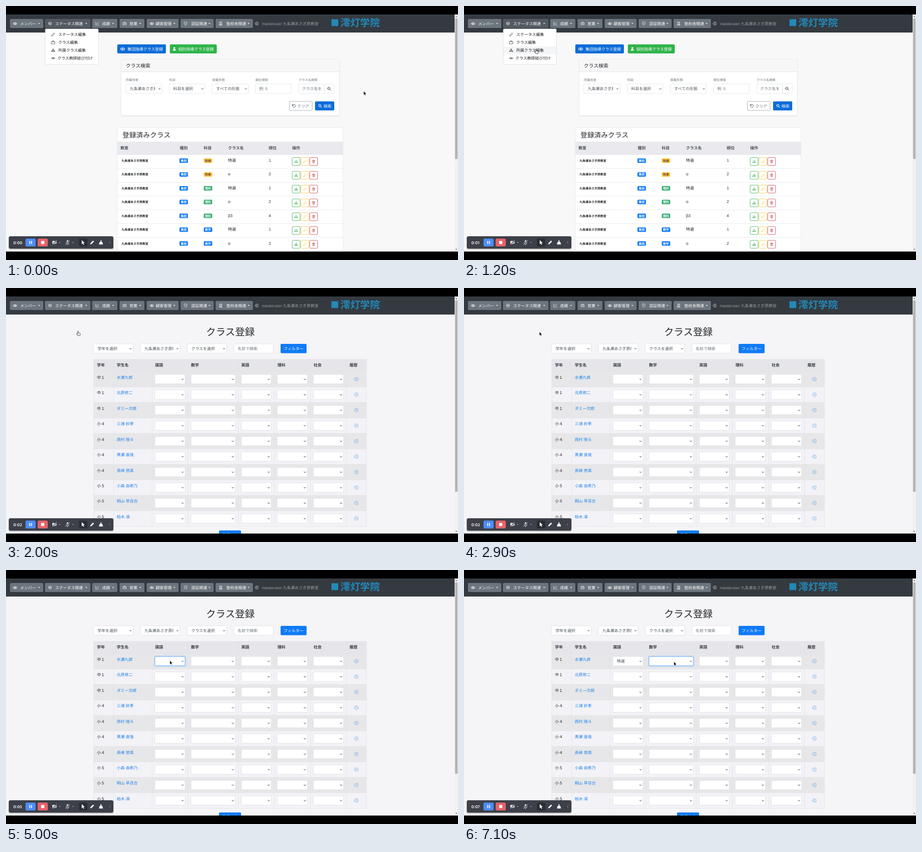
An HTML page that plays this animation: 800x450 px, repeating every 8 s.

```html
<!DOCTYPE html>
<html lang="ja">
<head>
<meta charset="utf-8">
<title>クラス登録</title>
<style>
html, body { margin: 0; width: 100%; height: 100%; overflow: hidden; background: #000; }
svg { display: block; }
text {
  font-family: "Liberation Sans", "Noto Sans CJK JP", "Noto Sans CJK", sans-serif;
  text-rendering: geometricPrecision;
  white-space: pre;
}
.timer { font-family: Inter, sans-serif; font-weight: 600; }
</style>
</head>
<body>
<svg id="stage" width="800" height="450" viewBox="0 0 800 450"></svg>
<script>
const INK = '#212529', MUTED = '#6c757d', BLUE = '#0d6cd8', BRIGHT = '#107bf5', LINE = '#ced4da';
const SCHOOL = '九条瀬あさぎ原教室';

// y is the vertical middle of the text
const text = (x, y, s, { size = 7, fill = INK, bold, anchor = 'start', cls = '', id = '' } = {}) =>
  `<text x="${x}" y="${y + size * 0.38}" font-size="${size}" fill="${fill}" text-anchor="${anchor}"` +
  `${bold ? ' font-weight="700"' : ''}${cls && ` class="${cls}"`}${id && ` id="${id}"`}>${s}</text>`;
const rect = (x, y, x2, y2, fill, { r = 0, stroke = 'none', w = 0.5, id = '' } = {}) =>
  `<rect x="${x}" y="${y}" width="${x2 - x}" height="${y2 - y}" rx="${r}" fill="${fill}"` +
  ` stroke="${stroke}" stroke-width="${w}"${id && ` id="${id}"`}/>`;
const path = (d, fill, stroke = 'none', w = 0.7) =>
  `<path d="${d}" fill="${fill}" stroke="${stroke}" stroke-width="${w}" stroke-linejoin="round" stroke-linecap="round"/>`;
const group = (id, body) => `<g id="${id}">${body}</g>`;
const clipped = (x, y, w, s, opt) =>
  `<svg x="${x}" y="${y - 7}" width="${w}" height="14">${text(0, 7, s, opt)}</svg>`;
const range = n => [...Array(n).keys()];

const ring = (x, y, r) => `M${x - r} ${y}a${r} ${r} 0 1 0 ${2 * r} 0a${r} ${r} 0 1 0 ${-2 * r} 0z`;
const OUTLINE = {
  gear: ring(0, 0, 3) + ring(0, 0, 1.2),
  chart: 'M-3-3V3H3.5M-2 1L-.3-1L1 .2L3-2.4',
  bag: 'M-3-1.6H3V2.7H-3zM-1.1-1.6V-2.8H1.1V-1.6',
  kit: 'M-3-1.6H3V2.7H-3zM-1.1-1.6V-2.8H1.1V-1.6M-3 .5H3',
  shield: 'M0-3.3L2.7-2.4V0Q2.5 2.4 0 3.4Q-2.5 2.4-2.7 0V-2.4zM0-1.2V.8',
  building: 'M-2-3H2V3H-2zM-.8-1.5H.8M-.8 0H.8M-.8 1.5H.8M-3 3H3',
  pencil: 'M-2.8 2.8L-2.2 .8L1.8-3L3-1.8L-1 2.2z',
  link: 'M-.4-1.2H-1.8a1.2 1.2 0 0 0 0 2.4H-.4M.4-1.2H1.8a1.2 1.2 0 0 1 0 2.4H.4M-1.3 0H1.3',
  search: ring(-.6, -.6, 2) + 'M.9 .9L2.8 2.8',
  undo: 'M-2.7-2.8V-.8H-.7M-2.5-.9A2.7 2.7 0 1 1-2 1.8',
  trash: 'M-2.5-2H2.5M-1-2V-3H1V-2M-2-2L-1.7 3H1.7L2-2M-.6-.8V1.8M.6-.8V1.8',
  clock: ring(0, 0, 3.2) + 'M0-1.7V.2L1.3 1.1',
  account: ring(0, 0, 3) + ring(0, -.7, 1) + 'M-1.9 2.2Q0 .2 1.9 2.2',
};
const SOLID = {
  users: ring(0, -1.3, 1.3) + 'M-2.2 2.6a2.2 2.2 0 0 1 4.4 0z' + ring(-2.9, -.9, .9) + ring(2.9, -.9, .9) +
    'M-4.2 1.8a1.5 1.5 0 0 1 2-1.4L-2.7 1.8zM4.2 1.8a1.5 1.5 0 0 0-2-1.4L2.7 1.8z',
  user: ring(0, -1.6, 1.6) + 'M-2.8 3a2.8 2.8 0 0 1 5.6 0z',
  tree: 'M-.9-2.8H.9V-1.1H.2V-.1H2.6V1H3.4V2.7H1.6V1H2.1V.4H.2V1H.9V2.7H-.9V1H-.2V.4H-2.1V1H-1.6V2.7H-3.4V1H-2.6V-.1H-.2V-1.1H-.9z',
};
const icon = (name, x, y, color, k = 1, w = 0.7) =>
  `<g transform="translate(${x} ${y}) scale(${k})">` +
  (SOLID[name] ? path(SOLID[name], color) : path(OUTLINE[name], 'none', color, w)) + '</g>';
const caret = (x, y, color) => path(`M${x - 1.8} ${y - .8}h3.6l-1.8 1.8z`, color);
const chevron = (x, y) => path(`M${x - 1.4} ${y - .7}l1.4 1.5l1.4-1.5`, 'none', '#343a40', 0.9);

const field = (x, y, x2, y2, id = '') => rect(x, y, x2, y2, '#fff', { r: 1.7, stroke: LINE, id });
const select = (x, y, x2, y2, s = '') =>
  field(x, y, x2, y2) + chevron(x2 - 4.5, (y + y2) / 2 + .3) +
  (s && clipped(x + 7, (y + y2) / 2, x2 - x - 19, s, { fill: '#495057' }));

function navbar() {
  const items = [
    [7, 66, 'users', 25, 'メンバー'], [69, 149.5, 'gear', 87, 'ステータス関連'], [152.5, 197, 'chart', 170, '成績'],
    [201, 245, 'kit', 218.5, '営業'], [249, 305.5, 'users', 265, '顧客管理'],
    [309, 367.5, 'shield', 328, '認証関連'], [371, 437, 'building', 390, '塾校舎関連'],
  ];
  return rect(0, 15, 794, 47, '#343a40') +
    items.map(([x, x2, name, tx, s], i) =>
      rect(x, 23, x2, 39, MUTED, { r: 1.7, id: i === 1 ? 'status' : '' }) +
      icon(name, x + 9, 31, '#f4f5f6', .9) + text(tx, 31, s, { fill: '#fff' }) + caret(x2 - 7.5, 31, '#fff')).join('') +
    icon('account', 444, 31, '#a5a8ab') +
    text(453, 31, 'masteruser ' + SCHOOL, { fill: '#999c9f' }) +
    rect(576, 23.5, 588, 35.5, '#2389b9') +
    text(592, 29.7, '澪灯学院', { size: 17.4, fill: '#2389b9', bold: true });
}

function dropdown() {
  const items = [['pencil', 92.5, 'ステータス編集'], ['bag', 92.5, 'クラス編集'],
    ['tree', 92.5, '所属クラス編集'], ['link', 91, 'クラス教師結び付け']];
  return rect(69.5, 40.5, 163.5, 103.5, '#fff', { r: 1.8, stroke: '#d0d0d0' }) +
    rect(70, 0, 163, 14, '#f4f5f7', { id: 'hover' }) +
    items.map(([name, x, s], i) => icon(name, 83.5, 50.5 + 14 * i, '#343a40', .95) + text(x, 50.5 + 14 * i, s)).join('');
}

function scrollbar(end) {
  return rect(794, 15, 800, 435, '#f1f1f1') + rect(794.8, 22, 799.2, end, '#b3b3b3') +
    path('M795.5 19.5h3l-1.5-2z', '#555') + path('M795.5 430.5h3l-1.5 2z', '#555');
}

function classList() {
  const labels = [[212, '所属校舎'], [289, '科目'], [365, '授業形態'], [441.5, '順位検索'], [518, 'クラス名検索']];
  const heads = [[202.5, '教室'], [307.5, '種別'], [350, '科目'], [393, 'クラス名'], [465, '順位'], [506.5, '操作']];
  const tones = { 社会: ['#ffc640', '#4a2c40'], 理科: ['#3fae78', '#fff'], 数学: ['#107bf5', '#fff'] };
  const rows = [['社会', '特選', 1], ['社会', 'α', 2], ['理科', '特選', 1], ['理科', 'α', 2],
    ['理科', 'β3', 4], ['数学', '特選', 1], ['数学', 'α', 2]];
  const badge = (x, y, s, [bg, fg]) => rect(x, y - 4, x + 15, y + 4, bg, { r: 1.6 }) +
    text(x + 7.5, y, s, { size: 5.25, fill: fg, bold: true, anchor: 'middle' });
  const action = (x, y, name, color) => rect(x, y - 7, x + 14, y + 7, '#fff', { r: 1.6, stroke: color, w: .7 }) +
    icon(name, x + 7, y, color, .85);

  return rect(0, 47, 794, 435, '#f8f8f9') +
    rect(197, 68, 283, 84, BLUE, { r: 1.7 }) + icon('users', 206.5, 76, '#fff') +
    text(215, 76, '集団指導クラス登録', { fill: '#fff' }) +
    rect(290, 68, 373, 84, '#2fb44a', { r: 1.7 }) + icon('user', 298, 76, '#fff') +
    text(305, 76, '個別指導クラス登録', { fill: '#fff' }) +
    rect(203, 95, 591, 196, '#eeeef0', { r: 2 }) +
    rect(203.5, 94.5, 590, 194, '#fff', { r: 1.7, stroke: '#dedee0' }) +
    rect(204, 95, 589.7, 116.5, '#f7f7f8') + rect(204, 116.3, 589.7, 116.9, '#dcdcdf') +
    text(212, 105.5, 'クラス検索', { size: 8.75 }) +
    labels.map(([x, s]) => text(x, 131, s, { size: 5.6, fill: MUTED })).join('') +
    select(212, 138, 276, 155, SCHOOL) + select(289, 138, 352, 155, '科目を選択') +
    select(365, 138, 429, 155, 'すべての形態') +
    field(441.5, 138, 505, 155) + text(448, 146.5, '例: 5', { fill: MUTED }) +
    field(518, 138, 564, 155) + clipped(524, 146.5, 35, 'クラス名を', { fill: MUTED }) +
    field(564, 138, 581, 155) + icon('search', 572, 146.5, '#343a40', 1, .9) +
    rect(501.5, 169, 542, 185, '#fff', { r: 1.7, stroke: MUTED }) + icon('undo', 509.5, 177, '#495057', 1, .9) +
    text(515.5, 177, 'クリア', { fill: MUTED }) +
    rect(547, 169, 581, 185, BLUE, { r: 1.7 }) + icon('search', 556, 177, '#fff', 1, 1) +
    text(562, 177, '検索', { fill: '#fff' }) +
    rect(197, 215.5, 596.5, 440, '#fff', { r: 1.7, stroke: '#dedee0' }) +
    text(206, 228, '登録済みクラス', { size: 12.2 }) +
    rect(197, 241, 596.5, 263, '#e9e9ee') + rect(197, 240.6, 596.5, 241.2, '#dcdce1') +
    heads.map(([x, s]) => text(x, 251.7, s, { bold: true, fill: '#495057' })).join('') +
    rows.map(([subject, name, rank], i) => {
      const y = 274 + 24.45 * i;
      return rect(197, y - 10.9, 596.5, y - 10.3, '#dee2e6') +
        text(204.5, y, SCHOOL, { size: 5.25, bold: true }) +
        badge(307, y, '集団', ['#107bf5', '#fff']) + badge(350, y, subject, tones[subject]) +
        text(393, y - .7, name) + text(465, y - .7, rank) +
        action(506.5, y + 1.5, 'tree', '#35ae55') + action(522, y + 1.5, 'pencil', '#fbc52d') +
        action(537.5, y + 1.5, 'trash', '#c9404e');
    }).join('') + scrollbar(271);
}

const COLUMNS = [[263.5, 317], [327.5, 406], [416.5, 469.5], [480, 533.5], [544, 597.5]];

function enrolment() {
  const heads = [[161, '学年'], [196, '学生名'], [264, '国語'], [327.5, '数学'], [416.5, '英語'],
    [480.5, '理科'], [544.5, '社会'], [608, '履歴']];
  const students = ['水瀬九郎', '北原修二', 'ダミー次郎', '三浦 紗季', '西村 陸斗', '黒瀬 直哉', '長峰 悠真',
    '小森 由希乃', '桐山 早百合', '柏木 凛'];
  const grade = i => i < 3 ? '中１' : i < 7 ? '小４' : '小５';
  const focus = (id, [x, x2]) => group(id,
    rect(x - .7, 152.6, x2 + .7, 170.4, 'none', { r: 2.2, stroke: '#b5d6fb', w: 1.5 }) +
    rect(x, 153.3, x2, 169.7, 'none', { r: 1.7, stroke: '#6fb0fb', w: .7 }));

  return rect(0, 47, 794, 435, '#f5f4f7') +
    text(397, 77.5, 'クラス登録', { size: 17.3, anchor: 'middle' }) +
    select(155, 99, 225, 115.5, '学年を選択') + select(238, 99, 308, 115.5, SCHOOL) +
    select(321, 99, 390.5, 115.5, 'クラスを選択') +
    field(403.5, 99, 473, 115.5) + text(410, 107.2, '名前で検索', { fill: MUTED }) +
    rect(486, 99, 532, 115.5, BRIGHT, { r: 1.7 }) +
    text(509, 107.2, 'フィルター', { fill: '#fff', anchor: 'middle' }) +
    rect(155, 126, 638, 148, '#e6e6ea') +
    heads.map(([x, s]) => text(x, 136.5, s, { bold: true, fill: '#343a40' })).join('') +
    range(10).map(i => rect(155, 148 + 27.43 * i, 638, 175.43 + 27.43 * i, i % 2 ? '#f3f2f6' : '#e7e7e9')).join('') +
    [155.2, 190.7, 258.5, 322, 411, 475, 539, 602.7, 638].map(x => rect(x - .25, 126, x + .25, 422.3, '#dcdfe3')).join('') +
    range(11).map(i => rect(155, 147.7 + 27.43 * i, 638, 148.2 + 27.43 * i, '#dcdfe3')).join('') +
    students.map((name, i) => {
      const y = 158.3 + 27.43 * i;
      return text(161, y, grade(i)) + text(196, y, name, { fill: '#1a80ee' }) +
        COLUMNS.map(([x, x2]) => select(x, y - 5, x2, y + 11.4)).join('') +
        icon('clock', 620.3, y + 3.2, '#5b9fe4', 1, .6);
    }).join('') +
    text(270.5, 161.5, '特選', { fill: '#495057', id: 'choice' }) +
    focus('focus0', COLUMNS[0]) + focus('focus1', COLUMNS[1]) +
    rect(377, 429.5, 416, 446, BRIGHT, { r: 1.7 }) +
    text(396.5, 437.7, '登録する', { fill: '#fff', anchor: 'middle' }) + scrollbar(361);
}

function recorder() {
  const slash = x => path(`M${x - 3.3} 422.5L${x + 3.3} 415.5`, 'none', '#fff', .8);
  return rect(4, 407.5, 191, 432, '#0002', { r: 4 }) +
    rect(5, 408, 190, 430, '#3d4048', { r: 3 }) +
    text(13, 419, '0:00', { size: 6.8, fill: '#fff', cls: 'timer', id: 'timer' }) +
    rect(34.5, 412, 52.5, 426, '#4c8df6', { r: 2.5 }) +
    rect(41.2, 416.2, 42.7, 421.8, '#fff') + rect(44.5, 416.2, 46, 421.8, '#fff') +
    rect(56, 412, 74, 426, '#e4626a', { r: 2.5 }) + rect(62.2, 416.2, 67.8, 421.8, '#fff', { r: .5 }) +
    rect(82, 416.3, 87.5, 421.8, '#f2f2f3', { r: 1 }) + path('M87.5 418.5l2-1.3v4l-2-1.3z', '#f2f2f3') +
    path('M82.7 422.5L89.3 415.5', 'none', '#3d4048', 2) + slash(86) + caret(95, 419, '#989ba2') +
    rect(107.6, 415, 110.4, 420, '#f2f2f3', { r: 1.4 }) +
    path('M106.3 419a2.7 2.7 0 0 0 5.4 0M109 421.7v1.5', 'none', '#f2f2f3') +
    path('M105.7 422.5L112.3 415.5', 'none', '#3d4048', 2) + slash(109) + caret(118.5, 419, '#989ba2') +
    rect(129, 412, 144, 426, '#2b2d34', { r: 2 }) +
    path('M134 414.8v7.4l1.8-1.6l1.3 2.6l1.2-.6l-1.3-2.5h2.4z', '#fff') +
    path('M149 422.3l.6-2.2l4.5-4.5l1.7 1.7l-4.5 4.5z', '#fff') +
    path('M167.3 415h1.6v3h1.7l1 4.4h-7l1-4.4h1.7z', '#fff') +
    path('M184.2 417l-1.8 2l1.8 2', 'none', '#8f9299');
}

const $ = id => document.getElementById(id);
$('stage').innerHTML =
  group('list', classList()) + group('enrol', enrolment()) + navbar() + group('menu', dropdown()) + recorder() +
  group('pointer',
    group('arrow', path('M0 0V6.8L1.6 5.4L2.7 7.8L3.8 7.3L2.7 5H4.8z', '#000', '#fff', .5)) +
    group('hand', path('M-.7 .6a.7 .7 0 0 1 1.4 0V3l2.6 .6q.7 .2 .6 1L3.4 7.8H-.6L-2.6 5q-.3-.8 .5-.8L-.7 5z', '#fff', '#222', .7))) +
  rect(0, 0, 800, 15, '#000') + rect(0, 435, 800, 450, '#000');

// Pointer tip: time, x, y
const TRACK = [
  [0, 633, 151], [700, 137, 89.5], [900, 137, 89.5], [1200, 127.5, 76.5], [2800, 127.5, 76.5],
  [3600, 266.5, 103.5], [3900, 266.5, 103.5], [4200, 290, 160.5], [6299, 290, 160.5],
  [6300, 290, 191], [6700, 371.5, 162.5], [8000, 371.5, 162.5],
];
const SECONDS = [1000, 2000, 3000, 4000, 5000, 6100, 7000];

function pointerAt(t) {
  const i = TRACK.findIndex(p => p[0] > t);
  const [t0, x0, y0] = TRACK[i - 1], [t1, x1, y1] = TRACK[i];
  const u = (t - t0) / (t1 - t0), e = u * u * (3 - 2 * u);
  return [x0 + (x1 - x0) * e, y0 + (y1 - y0) * e];
}

const show = (id, on) => $(id).setAttribute('visibility', on ? 'visible' : 'hidden');
const fade = (id, v) => $(id).setAttribute('opacity', Math.min(1, Math.max(0, v)));

function draw(now) {
  const t = Math.floor(now % 8000 / 100) * 100;
  const [x, y] = pointerAt(t);
  const onMenu = t < 1700, onList = t < 2000, hand = t >= 600 && t < 2900;
  const row = Math.floor((y + 2 - 43.5) / 14);

  show('list', onList);
  show('enrol', !onList);
  show('menu', onMenu);
  show('hover', onMenu && hand && row >= 0 && row < 4);
  $('hover').setAttribute('y', 43.5 + 14 * row);
  $('status').setAttribute('fill', onMenu ? '#545b62' : onList ? '#60686f' : MUTED);
  show('choice', !onList && t >= 6300);
  fade('focus0', t < 7000 ? (t - 4400) / 200 : (7100 - t) / 200);
  fade('focus1', (t - 6900) / 200);
  show('arrow', !hand);
  show('hand', hand);
  $('pointer').setAttribute('transform', `translate(${x} ${y})`);
  $('timer').textContent = '0:0' + SECONDS.filter(s => s <= t).length;
}

function tick() {
  draw(performance.now());
  requestAnimationFrame(tick);
}
tick();
</script>
</body>
</html>
```
